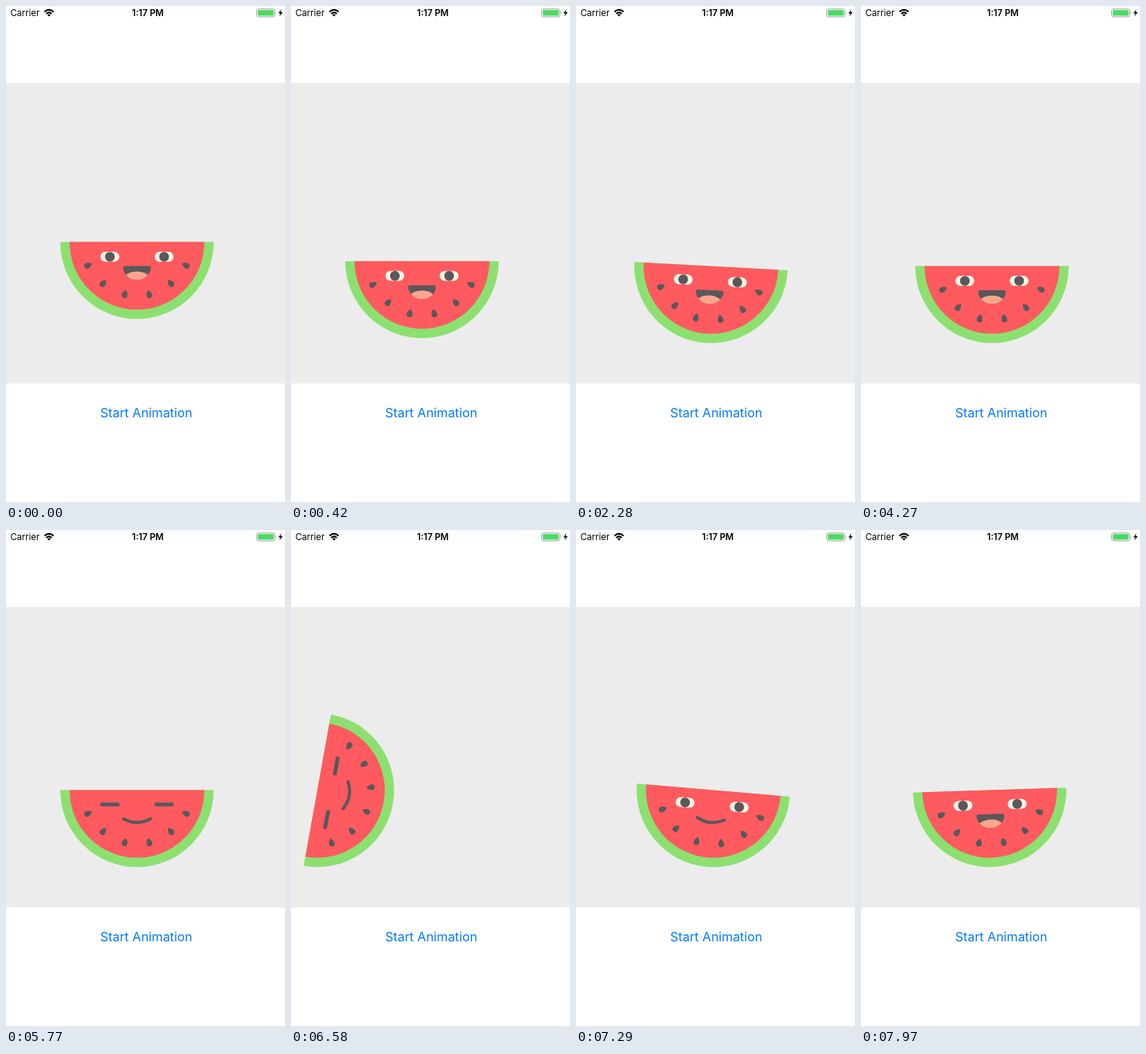
Animation, 360 px wide and 638 px high, one loop 8 s. Source, as an HTML page:

```html
<!DOCTYPE html>
<html lang="en">
<head>
<meta charset="utf-8">
<title>Watermelon</title>
<style>
  html, body { margin: 0; width: 100%; height: 100%; overflow: hidden; background: #fff; }
  svg { display: block; width: 100vw; height: 100vh; }
  text { font-family: Inter, Roboto, sans-serif; text-anchor: middle; }
  .dark { fill: #59585a; }
  .line { fill: none; stroke: #59585a; stroke-linecap: round; }
</style>
</head>
<body>
<svg viewBox="0 0 360 638">
  <defs>
    <path id="mouthShape" d="M-15 31H15Q18.6 31 17.8 35C15.5 44 8 49 0 49S-15.5 44-17.8 35Q-18.6 31-15 31Z"/>
    <clipPath id="mouthClip"><use href="#mouthShape"/></clipPath>
    <path id="seed" class="dark" d="M0-5.5C2.5-3 3.7-.5 3.7 1.5A3.7 3.7 0 0 1-3.7 1.5C-3.7-.5-2.5-3 0-5.5Z"/>
    <g id="eye">
      <rect x="-12.2" y="-6.4" width="24.4" height="12.8" rx="6.4" fill="#fdf3e1"/>
      <circle r="6.3" class="dark"/>
    </g>
    <path id="lid" class="line" stroke-width="5" d="M-10 0H10"/>
  </defs>

  <rect y="99" width="360" height="386.5" fill="#ececec"/>

  <!-- status bar -->
  <text x="24.5" y="13" font-size="11.5">Carrier</text>
  <g fill="none" stroke="#000" stroke-width="2">
    <path d="M49.6 7.6Q55.5 2.2 61.4 7.6M51.9 10Q55.5 6.8 59.1 10"/>
  </g>
  <path d="M53.4 11.4Q55.5 9.8 57.6 11.4L55.5 13.6Z"/>
  <text x="183" y="13" font-size="11.5" font-weight="600">1:17 PM</text>
  <rect x="323.5" y="3.8" width="23.4" height="10.2" rx="2.4" fill="#fff" stroke="#999" stroke-width=".9"/>
  <rect x="325" y="5.3" width="20.4" height="7.2" rx="1" fill="#4cd964"/>
  <path d="M347.9 7.2q1.6 1.7 0 3.4z" fill="#999"/>
  <path d="M355.4 4.2L351.4 9.4H354L352.8 13.4L357 8H354.4Z"/>

  <text x="181" y="529" font-size="16.4" fill="#007aff">Start Animation</text>

  <g id="melon">
    <path d="M-99 0H99A99 99 0 0 1-99 0Z" fill="#8ce070"/>
    <path d="M-87 0H87A87 87 0 0 1-87 0Z" fill="#ff5a5f"/>
    <g id="seeds"></g>
    <g id="eyesOpen"><use href="#eye" x="-35" y="18.9"/><use href="#eye" x="35" y="18.9"/></g>
    <g id="eyesShut"><use href="#lid" x="-35" y="18.5"/><use href="#lid" x="35" y="18.5"/></g>
    <g id="mouth">
      <use href="#mouthShape" class="dark"/>
      <ellipse cy="47.5" rx="16.5" ry="9.7" fill="#ffa58e" clip-path="url(#mouthClip)"/>
    </g>
    <path id="smile" class="line" stroke-width="4" d="M-17.5 37Q0 46.5 17.5 37"/>
  </g>
</svg>
<script>
const LOOP = 8000, ROLL_RADIUS = 97;
const $ = id => document.getElementById(id);
const show = (id, on) => $(id).style.display = on ? '' : 'none';
const within = (t, a, b) => t >= a && t < b;

$('seeds').innerHTML = [[63, 30], [43.5, 53], [15.7, 67]].flatMap(([x, y]) =>
  [-1, 1].map(side => {
    const turn = 180 - Math.atan2(side * x, y) * 180 / Math.PI + 180;
    return `<use href="#seed" transform="translate(${side * x} ${y}) rotate(${turn})"/>`;
  })).join('');

// cubic-bezier(x1, 0, x2, 1)
function ease(p, x1 = .42, x2 = .58) {
  if (p <= 0 || p >= 1) return p <= 0 ? 0 : 1;
  let lo = 0, hi = 1, s;
  for (let i = 0; i < 24; i++) {
    s = (lo + hi) / 2;
    const x = 3 * (1 - s) * s * ((1 - s) * x1 + s * x2) + s ** 3;
    if (x < p) lo = s; else hi = s;
  }
  return s * s * (3 - 2 * s);
}

const KICKS = [1270, 2170];
// start, end, angle from, angle to, easing handles
const ROLLS = [
  [6230, 6620, 0, -95, .42, 1],
  [6620, 7050, -95, 11.25, 0, .58],
  [7050, 7650, 11.25, -7.7],
  [7650, 8250, -7.7, 2.8]
];

function angleAt(t) {
  for (const start of KICKS) {
    const dt = t - start;
    if (within(dt, 0, 620)) return 11.5 * Math.exp(-.0072 * dt) * Math.sin(.0225 * dt);
  }
  for (const [start, end, from, to, x1, x2] of ROLLS)
    if (within(t, start, end)) return from + (to - from) * ease((t - start) / (end - start), x1, x2);
  return 0;
}

function draw(t) {
  const angle = angleAt(t);
  const x = 169 + angle * Math.PI / 180 * ROLL_RADIUS;
  const y = 334.6 - 31 * (1 - ease((t - 10) / 600));
  $('melon').setAttribute('transform', `translate(${x} ${y}) rotate(${angle})`);

  const shut = within(t, 3430, 3610) || within(t, 4090, 4270) || within(t, 5770, 6620);
  const smiling = within(t, 5770, 7650);
  show('eyesOpen', !shut);
  show('eyesShut', shut);
  show('mouth', !smiling);
  show('smile', smiling);
}

function tick() {
  draw(performance.now() % LOOP);
  requestAnimationFrame(tick);
}
tick();
</script>
</body>
</html>
```
